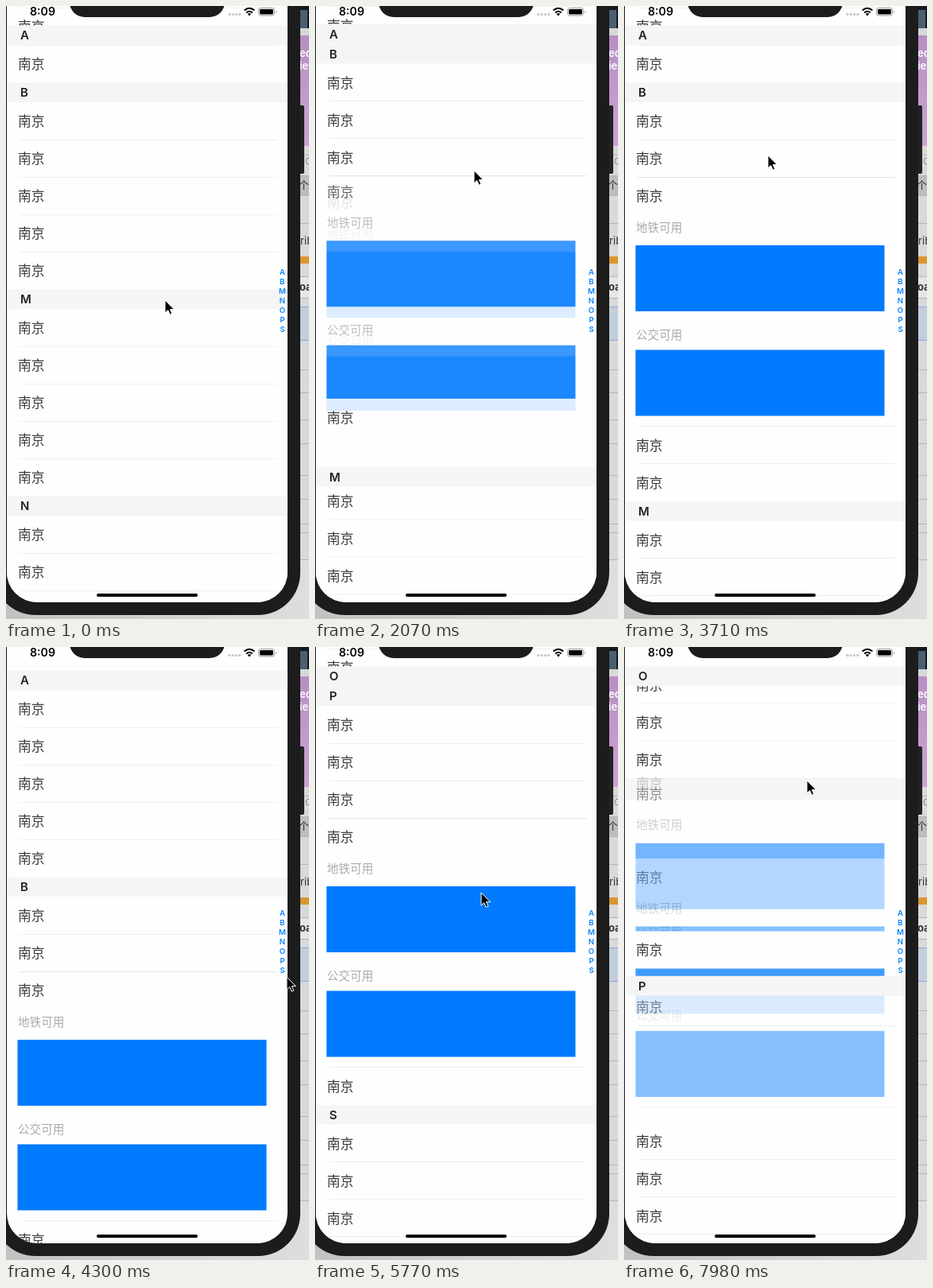
An HTML page that plays this animation: 381x771 px, repeating every 8 s.

```html
<!DOCTYPE html>
<html lang="zh">
<head>
<meta charset="utf-8">
<title>Expandable city list</title>
<style>
html, body { margin: 0; width: 100%; height: 100%; overflow: hidden; background: #c9c9c9; }
svg { display: block; }
text { font-family: Inter, "Noto Sans CJK SC", "Noto Sans CJK", sans-serif; }
.row { font: 16.8px "Noto Sans CJK SC", "Noto Sans CJK", sans-serif; fill: #3c3c3c; }
.sub { font: 14.6px "Noto Sans CJK SC", "Noto Sans CJK", sans-serif; fill: #aaa; }
.head { font-size: 15px; font-weight: 600; fill: #222; }
.index { font-size: 9.6px; font-weight: 600; fill: #0a84ff; text-anchor: middle; }
.side { font-size: 13px; fill: #333; }
</style>
</head>
<body>
<svg id="stage" width="381" height="771" viewBox="0 0 381 771">
  <defs>
    <clipPath id="screen"><rect x="1" y="-80" width="353" height="830" rx="38"/></clipPath>
    <linearGradient id="floor"><stop stop-color="#c2c2c2"/><stop offset="1" stop-color="#dedede"/></linearGradient>
    <linearGradient id="wall" x2="0" y2="1"><stop stop-color="#b78fc4"/><stop offset="1" stop-color="#cda3d2"/></linearGradient>
  </defs>
  <rect width="381" height="771" fill="url(#floor)"/>
  <g id="desk"></g>
  <rect x="366" y="125" width="9" height="86" rx="2" fill="#222"/>
  <rect x="-16" y="-90" width="386" height="856" rx="53" fill="#1c1c1d"/>
  <g clip-path="url(#screen)">
    <rect width="360" height="771" fill="#fefefe"/>
    <g id="list"></g>
    <g id="index"></g>
    <rect x="114" y="739" width="127" height="4" rx="2"/>
    <path d="M80 -5A19 19 0 0 0 99 14H256A19 19 0 0 0 275 -5Z" fill="#1c1c1d"/>
    <text x="30" y="12" font-size="14.2" font-weight="600">8:09</text>
    <g fill="#c4c4c4"><circle cx="281" cy="10.5" r="1.6"/><circle cx="285.3" cy="10.5" r="1.6"/><circle cx="289.6" cy="10.5" r="1.6"/><circle cx="293.9" cy="10.5" r="1.6"/></g>
    <g fill="none" stroke="#000" stroke-width="2"><path d="M299.6 5.6Q306 -.2 312.4 5.6M302.2 8.4Q306 5 309.8 8.4"/></g>
    <path d="M303.8 10Q306 8.2 308.2 10L306 12.4Z"/>
    <rect x="317.5" y="2.5" width="20" height="9.5" rx="2.8" fill="none" stroke="#999"/>
    <rect x="319" y="4" width="17" height="6.5" rx="1.4"/>
    <path d="M339 5.5q2 1.8 0 3.6z" fill="#999"/>
  </g>
  <path id="cursor" d="M0 0V16L3.7 12.6 6.2 18.2 8.8 17.1 6.4 11.6H11.4Z" stroke="#fff" stroke-width="1"/>
</svg>
<script>
const $ = id => document.getElementById(id);
const LOOP = 8000, TICK = 147.8;
const NAMES = 'ABMNOPS';
const ROW = 47, SECTION = 260, ROWS = 5, EXTRA = 266.5, PIN = 37;

// Each step: start tick, section, row, mode, scroll from, scroll to
const CLOSE = 0, OPEN = 1, KEEP = 2, NONE = 3;
const END = 1137;
const STEPS = [
  [-9, 0, 0, NONE, 193, 193],
  [1.5, 1, 4, OPEN, 193, 287],
  [5, 1, 4, CLOSE, 287, 287],
  [12.25, 1, 3, OPEN, 287, 240],
  [18.6, 1, 3, CLOSE, 240, 240],
  [22.2, 1, 2, OPEN, 240, 193],
  [25.5, 1, 2, KEEP, 193, 0],
  [30.5, 0, 0, NONE, END, END],
  [35.5, 5, 3, OPEN, END, 1280],
  [39.2, 5, 3, CLOSE, 1280, END],
  [42.4, 5, 1, OPEN, END, 1186],
  [45.6, 5, 1, CLOSE, 1186, END],
  [52.91, 4, 3, OPEN, END, 1020]
];

// Pointer path: tick, x, y
const POINTER = [
  [0, 200, 370], [1.5, 200, 335], [5, 202, 470], [8, 214, 664], [9, 214, 664],
  [10, 186, 380], [11, 200, 207], [18, 200, 207], [19, 195, 250], [21, 181, 188],
  [25, 181, 188], [25.5, 181, 230], [28.5, 260, 423], [29, 353, 415], [30.5, 347, 394],
  [34, 347, 394], [35.5, 240, 385], [39, 209, 309], [41, 230, 300], [45, 237, 221],
  [49, 238, 222], [53, 230, 168], [55, 230, 168]
];

const ease = t => (1 - Math.cos(Math.PI * t)) / 2;
const mix = (a, b, t) => a + (b - a) * t;
const rect = (x, y, w, h, fill) => `<rect x="${x}" y="${y}" width="${w}" height="${h}" fill="${fill}"/>`;
const text = (cls, x, y, s) => `<text class="${cls}" x="${x}" y="${y}">${s}</text>`;
const fade = (alpha, s) => `<g opacity="${alpha}">${s}</g>`;
const line = y => rect(18, y - .5, 323, 1, '#e2e2e2');
const city = y => text('row', 15, y + 6.3, '南京');

function row(y, last) {
  return rect(0, y - 23.5, 360, ROW, '#fefefe') + city(y) + (last ? '' : line(y + 23.5));
}

function details(y) {
  return city(y) + text('sub', 15, y + 44.5, '地铁可用') + rect(14.5, y + 62, 313, 83, '#007aff')
    + text('sub', 15, y + 179.5, '公交可用') + rect(14.5, y + 193.5, 313, 83, '#007aff');
}

// Expanded cell cut off at the given height
function cell(y, height, alpha, fill = 'none', rule = '') {
  const top = y - 23.5;
  return fade(alpha, `<svg y="${top}" width="360" height="${height}">`
    + rect(0, 0, 360, height, fill) + details(23.5) + rule + '</svg>');
}

function header(y, name) {
  return rect(0, y - 12.5, 360, 24.5, '#f5f5f5') + text('head', 18, y + 5.4, name);
}

function drawList(k) {
  const [at, sec, idx, mode, from, to] = STEPS.findLast(s => s[0] <= k);
  const t = Math.min(1, (k - at) / (mode === KEEP ? 3 : 2));
  const scroll = mix(from, to, ease(t));
  const moving = mode < KEEP && t < 1;
  const isOpen = mode === KEEP || mode === OPEN && t === 1;
  const e = mode === OPEN ? t : 1 - t;
  const q = ease(e), late = e > .7;
  const bump = 1.36 * Math.max(0, e - .53) * (1 - e);
  const headTop = s => 42 + SECTION * s - scroll;
  const rowTop = (s, r) => headTop(s) + 36 + ROW * r;

  let before = '', after = '';
  for (let s = 0; s < NAMES.length; s++) {
    for (let r = 0; r < ROWS; r++) {
      const last = r === ROWS - 1;
      const below = s > sec || s === sec && r > idx;
      let y = rowTop(s, r), alpha = 1;
      if (below && isOpen) y += EXTRA;
      if (below && moving) {
        const peek = s === sec + 1 && r === 0 && !late;
        y += s === sec || peek ? EXTRA * e : EXTRA;
        if (peek) alpha = e;
      }
      if (y < -340 || y > 800) continue;
      if (s === sec && r === idx && moving) continue;
      if (s === sec && r === idx && isOpen) before += details(y) + (last ? '' : line(y + 290));
      else if (below) after += alpha < 1 ? fade(alpha, row(y, last)) : row(y, last);
      else before += row(y, last);
    }
  }

  if (moving) {
    const base = rowTop(sec, idx);
    const cut = late ? ROW + EXTRA * e + 4 : 313.5;
    const ghost = cell(base + 1 + 232 * (1 - q), Math.min(313.5, 283 + 71 * (1 - q)),
      1 - e, '#fefefe', late ? '' : line(313));
    if (!late) before += rect(0, base - 23.5, 360, 27, '#f5f5f5') + fade(.25, city(base - 17));
    before += cell(base - 4, cut, e);
    if (late) after += ghost; else before += ghost;
  }

  // The next header trails the growing cell; later ones move at once
  const tops = [...NAMES].map((_, s) => {
    let y = headTop(s);
    if (s > sec && isOpen) y += EXTRA;
    if (s > sec && moving) y += s === sec + 1 ? EXTRA * (q + bump) : EXTRA;
    return y;
  });
  let heads = '';
  tops.forEach((y, s) => {
    const next = s + 1 < tops.length ? tops[s + 1] : 9999;
    const pinned = Math.min(Math.max(y, PIN), Math.max(y, next - 25));
    if (pinned > 0 && pinned < 790) heads += header(pinned, NAMES[s]);
  });
  $('list').innerHTML = before + after + heads;
}

function drawPointer(k) {
  const i = Math.max(1, POINTER.findIndex(p => p[0] >= k));
  const a = POINTER[i - 1], b = POINTER[i], t = (k - a[0]) / (b[0] - a[0]);
  $('cursor').setAttribute('transform', `translate(${mix(a[1], b[1], t)} ${mix(a[2], b[2], t)})`);
}

// Strip of windows visible behind the phone
function drawDesk() {
  const strip = (y, h, fill) => rect(360, y, 21, h, fill);
  const rules = [187, 213, 238, 273, 340, 367, 457, 486, 520, 550, 590, 620, 651, 662, 696];
  $('desk').innerHTML = strip(0, 36, '#15191d') + rect(370, 5, 9, 23, '#4a5f70')
    + strip(28, 9, '#d8d8d8') + strip(37, 139, 'url(#wall)')
    + `<g fill="#fff" font-size="13" font-weight="600"><text x="369" y="64">ed</text><text x="369" y="80">ies</text></g>`
    + strip(176, 520, '#d9d9d9') + strip(213, 25, '#bdbdbd')
    + '<circle cx="381" cy="195" r="4" fill="none" stroke="#888"/>'
    + text('side', 368, 230, '个人') + text('side', 370, 300, 'rib')
    + strip(315, 9, '#d9972f') + strip(341, 26, '#e6e6e6')
    + '<text class="side" x="369" y="358" font-weight="700">oa</text>'
    + strip(378, 43, '#c3cedb') + strip(378, 1, '#8cabd8') + strip(420, 1, '#8cabd8')
    + rules.map(y => strip(y, 1, '#b4b4b4')).join('');
}

drawDesk();
$('index').innerHTML = [...NAMES].map((c, i) => text('index', 347.5, 337.6 + 12 * i, c)).join('');

let shown = -1;
function frame(now) {
  const k = Math.floor((now % LOOP + 3) / TICK);
  if (k !== shown) {
    shown = k;
    drawList(k);
    drawPointer(k);
  }
  requestAnimationFrame(frame);
}
frame(0);
</script>
</body>
</html>
```
